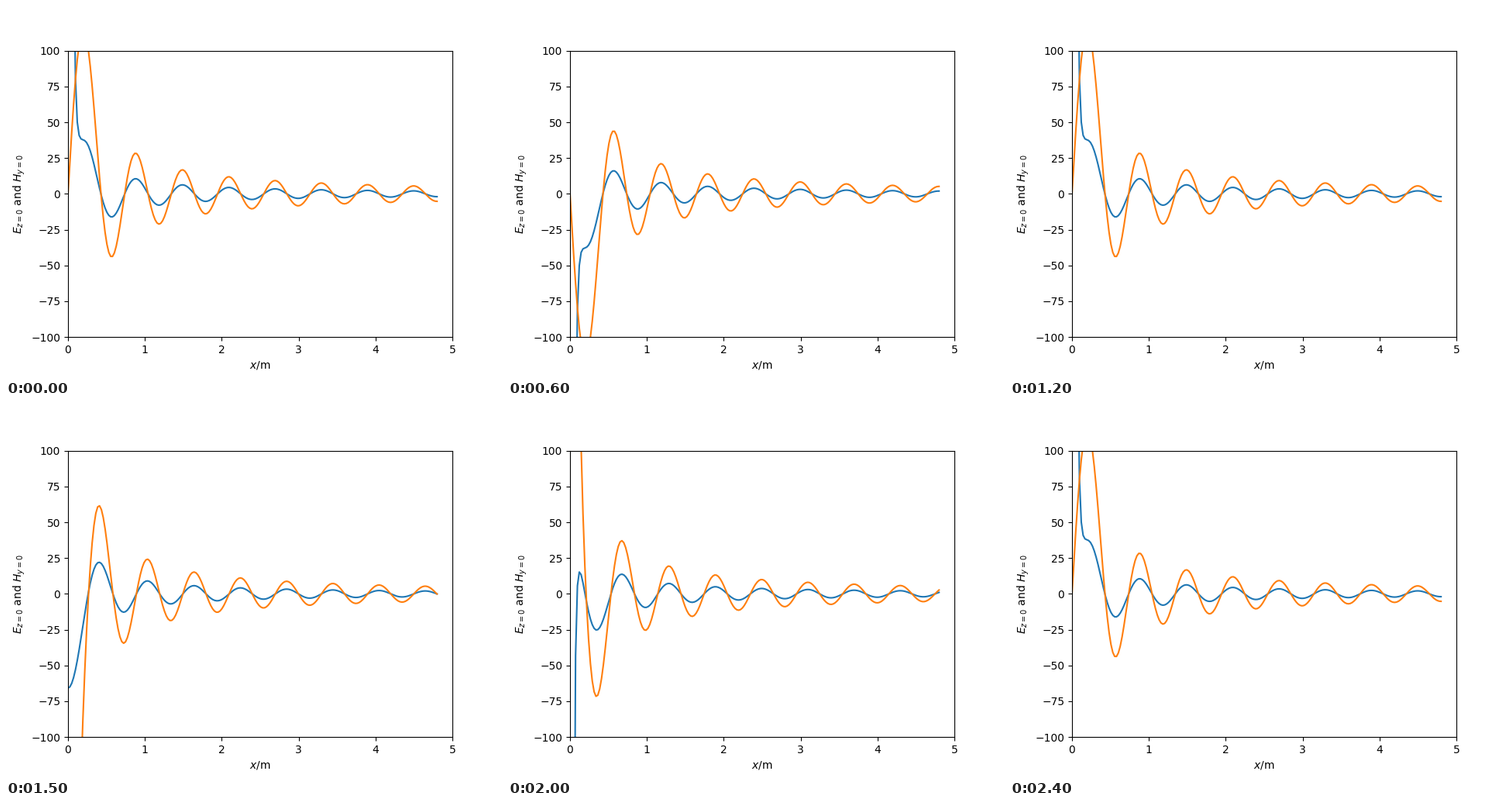
These frames come from a looping animation (640x480 px, 2.5 s). A matplotlib script:

```python
import numpy as np
import matplotlib.pyplot as plt
from matplotlib.animation import FuncAnimation

WAVELENGTH = 0.6           # m
MOMENT = 30                # current times dipole length, A m
IMPEDANCE = 0.12 * np.pi   # free space, kilo-ohm
STEPS = 12                 # frames per period
FRAMES = 2 * STEPS + 1

k = 2 * np.pi / WAVELENGTH
amp = MOMENT * k**2 / (4 * np.pi)
x = np.linspace(1e-4, 8 * WAVELENGTH, 200)
u = k * x


def fields(wt):
    """Electric (kV/m) and magnetic (A/m) field of an oscillating dipole."""
    c, s = np.cos(wt - u), np.sin(wt - u)
    h = -c / u - s / u**2
    e = h + c / u**3
    return amp * IMPEDANCE * e, amp * h


fig, ax = plt.subplots(figsize=(6.4, 4.8), dpi=100)
ax.set_xlim(0, 5)
ax.set_ylim(-100, 100)
ax.set_xlabel("$x$/m")
ax.set_ylabel("$E_{z=0}$ and $H_{y=0}$")
lines = [ax.plot([], [], color=color)[0] for color in ("C0", "C1")]


def update(i):
    for line, y in zip(lines, fields(2 * np.pi * (i % STEPS) / STEPS)):
        line.set_data(x, y)
    return lines


anim = FuncAnimation(fig, update, frames=FRAMES, interval=100,
                     repeat=True, repeat_delay=0)
plt.show()
```
